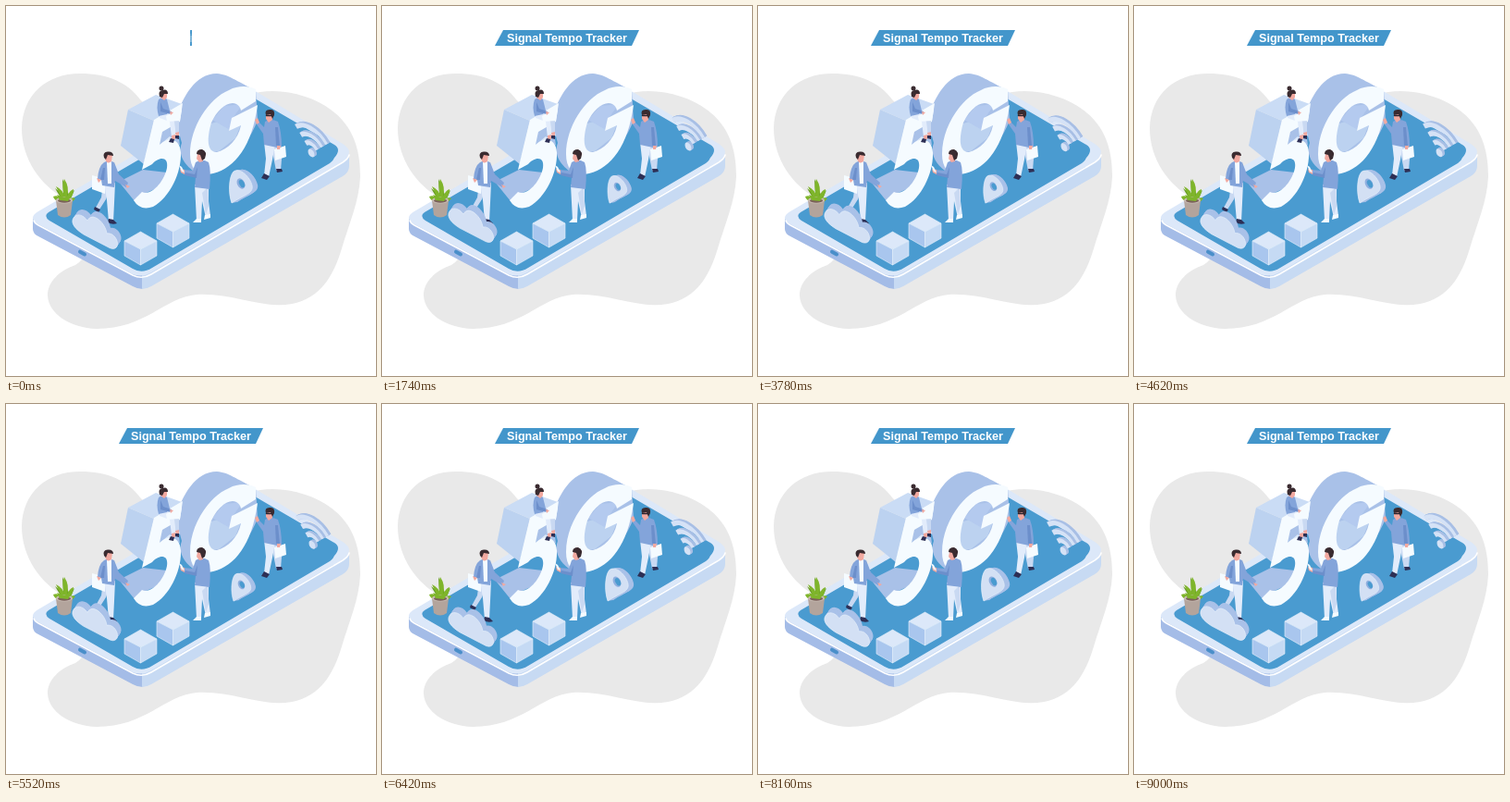
Animation of 400x400 px, one loop 9.03 s. Source, as an HTML page:

```html
<!DOCTYPE html>
<html lang="en">
<head>
<meta charset="utf-8">
<title>Signal Tempo Tracker</title>
<style>
  html, body { margin: 0; width: 100%; height: 100%; overflow: hidden; background: #fff; }
  svg { display: block; width: 100%; height: 100%; }
  text { font: bold 12.6px "Liberation Sans", Arial, sans-serif; fill: #fff; text-anchor: middle; }
  .blob { fill: #e9e9e9; }
  .blue { fill: #4a9bd0; }
  .side { fill: #a9c1e8; }
  .mid { fill: #bcd2f0; }
  .pale { fill: #d3e0f4; }
  .face { fill: #f5fbff; }
  .coat { fill: #83a4da; }
  .fold { fill: #6c8fcb; }
  .leg { fill: #e2ecfb; }
  .legShade { fill: #c9d9f2; }
  .skin { fill: #f2a9a0; }
  .dark { fill: #3a2b30; }
  .shoe { fill: #2d2f55; }
  .leaf { fill: #7fb52b; }
  .leafDark { fill: #659b20; }
  .line { fill: none; stroke-linecap: round; stroke-linejoin: round; }
</style>
</head>
<body>
<svg viewBox="0 0 400 400">
  <path class="blob" d="M17 132C18 96 44 73 80 73C110 73 132 83 145 101C170 132 225 108 262 96
    C292 86 330 96 351 112C376 130 383 156 383 184C382 211 371 235 363 262C354 292 340 316 309 322
    C276 328 246 310 206 312C171 315 151 349 98 349C70 348 46 333 45 313C45 298 58 286 75 280
    C100 265 85 228 62 207C38 194 17 166 17 132Z"/>

  <g id="phone">
    <path fill="#a4bce7" d="M29 230V241Q29 246 35 249L137 303Q142 306 148 306V286Z"/>
    <path fill="#c7daf3" d="M147 286V306Q152 306 157 303L364 184Q371 180 371 173V161Z"/>
    <path fill="#dce8f9" d="M35 222L253 94Q263 88 273 94L364 149Q378 158 364 168L157 288Q147 294 137 290L35 236Q23 229 35 222Z"/>
    <path class="line" stroke="#fff" stroke-width="1.6" d="M30 232Q31 235 35 237L137 291Q147 296 157 290L364 169Q370 165 371 161"/>
    <path class="blue" d="M46 223L257 100Q263 97 269 100L355 150Q363 155 355 164Q354 167 350 170L158 283Q147 290 137 284L47 232Q40 227 46 223Z"/>
    <path class="line" stroke="#4a8fca" stroke-width="4" d="M80 265.700L85 268.500"/>
  </g>

  <g id="wifi"></g>

  <g id="letterG">
    <path class="side" d="M183 122C191 99 204 73 228 73C241 74 248 81 270 91L272 124C255 165 225 184 205 180C194 173 185 161 190 148Z"/>
    <path class="mid" d="M218 128L244 121L241 135L254 128L248 143L230 157L216 157Z"/>
    <path fill="#b4caef" d="M223 123L236 108L256 106L246 120L242 134Z"/>
    <path class="face" fill-rule="evenodd" d="M270 90C264 87 252 85 241 91C219 100 199 131 199 160C199 178 209 185 224 181
      C248 175 266 151 272 107L244 121L241 135L254 129C251 144 240 155 228 158C217 158 217 143 222 126
      C229 111 241 102 249 106Q253 108 254 113L270 103Z"/>
  </g>

  <g id="letter5">
    <path class="mid" d="M132 112L160 124L149 171L124 151Z"/>
    <path fill="#cadcf5" d="M132 112L162 96L190 106L160 124Z"/>
    <path class="side" d="M122 190L148 177L174 180L172 193L147 204L139 211Z"/>
    <path class="side" d="M167 136L185 127L188 151L177 141L164 152Z"/>
    <path class="face" d="M160 123L191 105L188 125L169 136L166 150C177 140 188 144 189 158C190 180 177 207 159 217
      Q145 222 138 210L147 201C157 206 171 190 174 175C176 161 164 164 158 171L147 177Z"/>
  </g>

  <g id="plant">
    <path class="leafDark" d="M62 212L53 197L62 204L61 187L68 204L74 199L68 213Z"/>
    <path class="leaf" d="M61 213Q52 211 51 206Q56 204 60 208L54 195Q62 199 63 206Q60 194 63 187Q69 196 66 206Q69 199 73 198Q73 205 68 209Q72 206 75 208Q72 213 65 213Z"/>
    <path fill="#b3a49c" d="M54 210L56 226Q63 231 70 226L72 210Z"/>
    <ellipse cx="63" cy="210" rx="9" ry="3.500" fill="#c9bdb5"/>
    <ellipse cx="63" cy="210.500" rx="7" ry="2.200" fill="#7b6259"/>
    <path class="leaf" d="M58 210L55 204L63 207L72 203L67 211Z"/>
  </g>

  <g id="walker">
    <path class="legShade" d="M105 192L113 194L108 209L101 220L97 218L103 207Z"/>
    <path class="shoe" d="M96 217L102 220L100 223L95 220Z"/>
    <path class="leg" d="M106 191H118L117 213L116 233H111L109 210Z"/>
    <path class="shoe" d="M111 230L116 231L120 235Q115 237 110 234Z"/>
    <path class="face" d="M93 183L107 187V203L93 198Z"/>
    <path class="coat" d="M106 169Q111 166 117 169L122 182L132 191L130 196L118 189L117 196L104 194L103 188L99 187Q100 173 106 169Z"/>
    <path class="face" d="M109 169L114 168L114 192L110 192Z"/>
    <path class="fold" d="M105 175L107 175L106 188L102 188Z"/>
    <path class="skin" d="M129 193L134 195L131 197ZM98 186L103 188L100 191ZM107 160Q110 157 115 161L114 168Q109 172 107 165Z"/>
    <path class="dark" d="M106 164Q104 158 110 157.500Q116 157 116 162L110 161L108 166Z"/>
  </g>

  <g id="sitter">
    <path class="leg" d="M166 116L176 115L183 120L184 141L179 142L177 125L166 121Z"/>
    <path class="legShade" d="M177 117L187 121L187 138L184 141L182 125Z"/>
    <path class="skin" d="M179 140L183 139V144L179 145ZM183 137L187 136V141L184 142Z"/>
    <path class="shoe" d="M178 143L182 144L181 148L176 147ZM183 140L187 140L187 144L183 143Z"/>
    <path class="coat" d="M165 101Q170 97 174 101L177 113L174 117L165 119Q162 109 165 101Z"/>
    <path class="fold" d="M167 104L170 111L179 114L178 117L167 114Z"/>
    <path class="face" d="M173 119L187 111L190 112L188 124L174 125Z"/>
    <path class="skin" d="M168 94L174 93L174 99L171 102L167 99ZM177 114L181 115L178 118Z"/>
    <path class="dark" d="M166 98Q164 92 169 91Q175 89 175 95L171 95L169 99Z"/>
    <circle class="dark" cx="168" cy="89" r="2.500"/>
  </g>

  <g id="visitor">
    <path class="legShade" d="M286 148L296 149L298 165L297 178L292 178Z"/>
    <path class="leg" d="M279 147L291 149L288 166L284 185L279 183L281 165Z"/>
    <path class="shoe" d="M279 181L285 184L282 188L276 186ZM292 176L298 176L299 179L293 180Z"/>
    <path class="coat" d="M280 125Q286 121 294 125Q298 136 298 152L293 153L279 150L278 138L271 128L273 125L279 131Z"/>
    <path class="fold" d="M291 131L294 131L296 151L292 151Z"/>
    <path class="face" d="M290 155L302 151L303 163L291 167Z"/>
    <path class="skin" d="M269 123L272 121L274 126L271 128ZM293 151L297 151L296 155L293 155ZM281 117L288 116L288 123L284 126L281 122Z"/>
    <path class="dark" d="M281 118Q279 112 285 112Q291 111 290 118L288 122L286 117Z"/>
    <path class="line" stroke="#2b2530" stroke-width="1.600" d="M281.500 118.500H287"/>
  </g>

  <g id="blocks"></g>

  <g id="pin"></g>

  <g id="caller">
    <path class="leg" d="M204 193H219L219 211L221 227L216 229L212 211L211 232H206Z"/>
    <path class="legShade" d="M212 202L218 196L219 216L216 225Z"/>
    <path class="face" d="M206 230H211L211 234H202ZM215 226L221 225L221 229L214 231Z"/>
    <path class="coat" d="M205 169Q212 164 219 169Q222 177 220 198L204 196L205 185L191 181L192 177L202 178Z"/>
    <path class="fold" d="M207 174L204 182L194 180L193 183L206 186Z"/>
    <path class="skin" d="M188 176L193 177L193 182L189 180ZM207 160L212 159L213 168L209 169L206 165Z"/>
    <path class="face" d="M187 172L190 174L193 180L190 179Z"/>
    <path class="dark" d="M206 160Q206 155 212 155Q218 157 215 165L212 167L210 161Z"/>
  </g>

  <g id="cloud"></g>

  <g id="banner">
    <path fill="#4396cb" d="M131 26H278L270 43H122Z"/>
    <text x="200" y="39">Signal Tempo Tracker</text>
  </g>
</svg>
<script>
  const LOOP = 9030, INTRO = 900, BOB = 1800;
  const el = id => document.getElementById(id);
  const shape = (d, attrs) => `<path d="${d}" ${attrs}/>`;

  // Stacks shifted copies behind a face to give it depth.
  function extrude(dx, dy, back, front, steps = 8) {
    let out = "";
    for (let i = steps; i > 0; i--)
      out += `<g transform="translate(${dx * i / steps} ${dy * i / steps})">${back}</g>`;
    return out + front;
  }

  function solid(id, d, dx, dy) {
    el(id).innerHTML = extrude(dx, dy, shape(d, 'class="side"'),
      shape(d, 'class="pale" stroke="#e6effb" stroke-width=".7"'));
  }

  solid("cloud", "M73 229C69 235 76 242 84 247L111 261C118 265 122 260 120 254C118 248 113 245 109 246" +
    "C108 238 101 229 94 228C91 228 89 230 88 232C83 225 76 224 73 229Z", 4, -6);

  solid("pin", "M244 213C240 202 241 184 246 179C253 174 264 185 266 194C268 203 257 204 244 213Z", 6, -1);
  el("pin").innerHTML += '<ellipse cx="254" cy="192" rx="4" ry="6" transform="rotate(-27 254 192)" fill="#8fafdf"/>' +
    '<ellipse cx="255" cy="192" rx="2.700" ry="4.500" transform="rotate(-27 255 192)" class="blue"/>';

  function wifiArcs(color) {
    const arcs = [10, 18.5, 27].map(r => {
      const k = r * Math.SQRT1_2;
      return `M${-k} ${-k}A${r} ${r} 0 0 1 ${k} ${-k}`;
    }).join("");
    return `<g transform="matrix(.866 .5 0 1 330 159)"><path class="line" d="${arcs}" stroke="${color}"
      stroke-width="4.6" style="stroke-linecap:butt"/><circle r="4" fill="${color}"/></g>`;
  }
  el("wifi").innerHTML = extrude(2.5, -1.5, wifiArcs("#a8bfe5"), wifiArcs("#d5e2f6"), 4);

  function block(x, y) {
    const at = `transform="translate(${x} ${y})" stroke="#e8f1fc" stroke-width=".6" stroke-linejoin="round"`;
    return shape("M0 0L17.500 10L0 19L-17.500 10Z", `fill="#dce8f9" ${at}`) +
      shape("M-17.500 10L0 19V36L-17.500 26Z", `fill="#a9c6ee" ${at}`) +
      shape("M0 19L17.500 10V26L0 36Z", `fill="#c5daf4" ${at}`);
  }
  el("blocks").innerHTML = block(180.5, 225) + block(145.5, 244);

  const move = (id, value) => el(id).setAttribute("transform", value);
  const wave = turn => (1 - Math.cos(turn * 2 * Math.PI)) / 2;

  function draw(t) {
    const open = t < INTRO ? 0.013 + 0.987 * wave(t / INTRO / 2) : 1;
    const lift = t < INTRO ? 0 : wave((t - INTRO) / BOB);
    move("banner", `translate(200 0) scale(${open} 1) translate(-200 0)`);
    move("cloud", `translate(0 ${-7 * lift})`);
    move("wifi", `translate(${lift} ${-7 * lift})`);
    move("pin", `translate(257 214) scale(${1 - 0.16 * lift}) translate(-257 -214)`);
  }

  const start = performance.now();
  function tick() {
    draw((performance.now() - start) % LOOP);
    requestAnimationFrame(tick);
  }
  tick();
</script>
</body>
</html>
```
